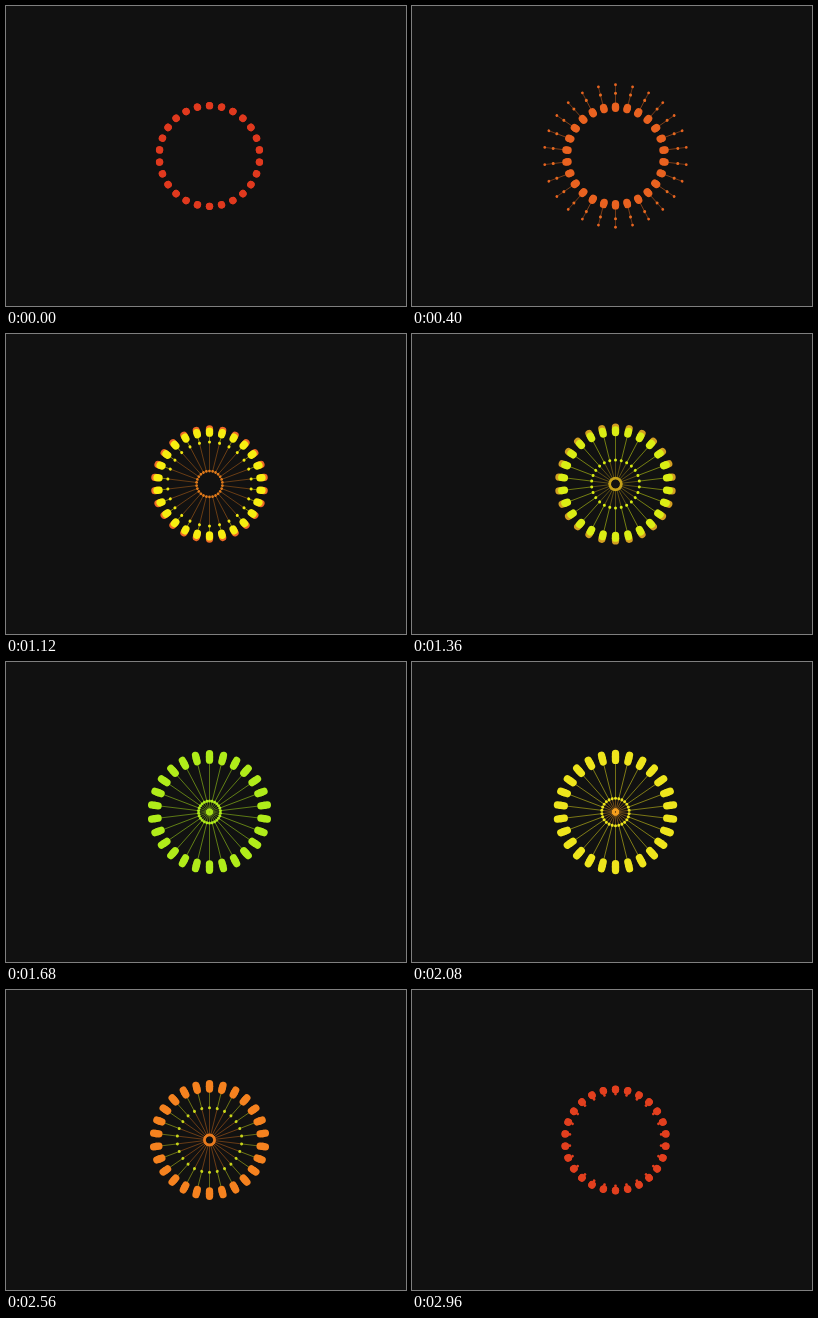
An HTML page with a canvas that plays this animation: 400x300 px, repeating every 3000 ms.

```html
<!DOCTYPE html>
<html>
<head>
<meta charset="utf-8">
<style>
html, body { margin: 0; width: 100%; height: 100%; overflow: hidden; background: #111; }
canvas { display: block; }
</style>
</head>
<body>
<canvas id="stage" width="400" height="300"></canvas>
<script>
const ctx = document.getElementById('stage').getContext('2d');
const LOOP = 3000, SPOKES = 26;
const times = [0, 560, 800, 1120, 1680, 2080, 2560, 3000];

// Distance from the centre and colour of each part at the key times
const parts = {
  outer: {
    r: [50.3, 49.8, 49.4, 55, 58.3, 58.5, 56.3, 50.3],
    c: ['e0391e', 'ee7820', 'fab022', 'ef6a26', 'b0ec1a', 'eee51c', 'f5821f', 'e0391e']
  },
  inner: {
    r: [50.3, 46.7, 44.8, 50.8, 51.8, 51.6, 51, 50.3],
    c: ['e0391e', 'ee7820', 'fab81f', 'f7ee10', 'b0ec1a', 'eee51c', 'f5821f', 'e0391e']
  },
  bead: {
    r: [50.3, 68, 77, 42, 11, 13.7, 32.3, 50.3],
    c: ['e0391e', 'ea8020', 'f0a820', 'f0e810', 'b0ec1a', 'eee51c', 'c8d61a', 'e0391e']
  },
  tip: {
    r: [50.3, 80.5, 98, 13, 2, 2.2, 5, 50.3],
    c: ['e0391e', 'ea7820', 'f0a020', 'e07a1a', 'a8e01a', 'f5a020', 'e87a1e', 'e0391e']
  }
};

// Smooth curve through the keys without overshoot
function curve(v, t) {
  const secant = i => (v[i + 1] - v[i]) / (times[i + 1] - times[i]);
  const slope = i => {
    if (i === 0) return secant(0);
    if (i === times.length - 1) return secant(i - 1);
    const a = secant(i - 1), b = secant(i);
    return a * b <= 0 ? 0 : 2 * a * b / (a + b);
  };
  let i = 0;
  while (t >= times[i + 1]) i++;
  const h = times[i + 1] - times[i], u = (t - times[i]) / h;
  const s = u * u * (3 - 2 * u);
  return v[i] + (v[i + 1] - v[i]) * s
    + h * u * (1 - u) * ((1 - u) * slope(i) - u * slope(i + 1));
}

function blend(colors, t) {
  const channel = k => Math.round(curve(colors.map(c => parseInt(c.substr(k, 2), 16)), t));
  return `rgb(${channel(0)},${channel(2)},${channel(4)})`;
}

function line(from, to, width, color, alpha = 1) {
  ctx.globalAlpha = alpha;
  ctx.lineWidth = width;
  ctx.strokeStyle = color;
  ctx.beginPath();
  ctx.moveTo(0, -from);
  ctx.lineTo(0, -to);
  ctx.stroke();
  ctx.globalAlpha = 1;
}

function dot(r, size, color) {
  ctx.fillStyle = color;
  ctx.beginPath();
  ctx.arc(0, -r, size, 0, 2 * Math.PI);
  ctx.fill();
}

function draw(now) {
  const t = now % LOOP, p = {};
  for (const name in parts) {
    p[name] = { r: curve(parts[name].r, t), c: blend(parts[name].c, t) };
  }
  const { outer, inner, bead, tip } = p;
  const middle = (outer.r + inner.r) / 2;

  ctx.setTransform(1, 0, 0, 1, 0, 0);
  ctx.fillStyle = '#111';
  ctx.fillRect(0, 0, 400, 300);
  ctx.translate(203.5, 150);
  ctx.lineCap = 'round';
  for (let i = 0; i < SPOKES; i++) {
    line(bead.r, tip.r, 0.7, tip.c, 0.55);
    line(middle, bead.r, 0.7, bead.c, 0.65);
    dot(tip.r, 1.4, tip.c);
    dot(bead.r, 1.5, bead.c);
    line(outer.r, middle + 0.01, 7.3, outer.c);
    line(middle, inner.r - 0.01, 7.3, inner.c);
    ctx.rotate(2 * Math.PI / SPOKES);
  }
}

const start = performance.now();
function tick() {
  draw(performance.now() - start);
  requestAnimationFrame(tick);
}
tick();
</script>
</body>
</html>
```
